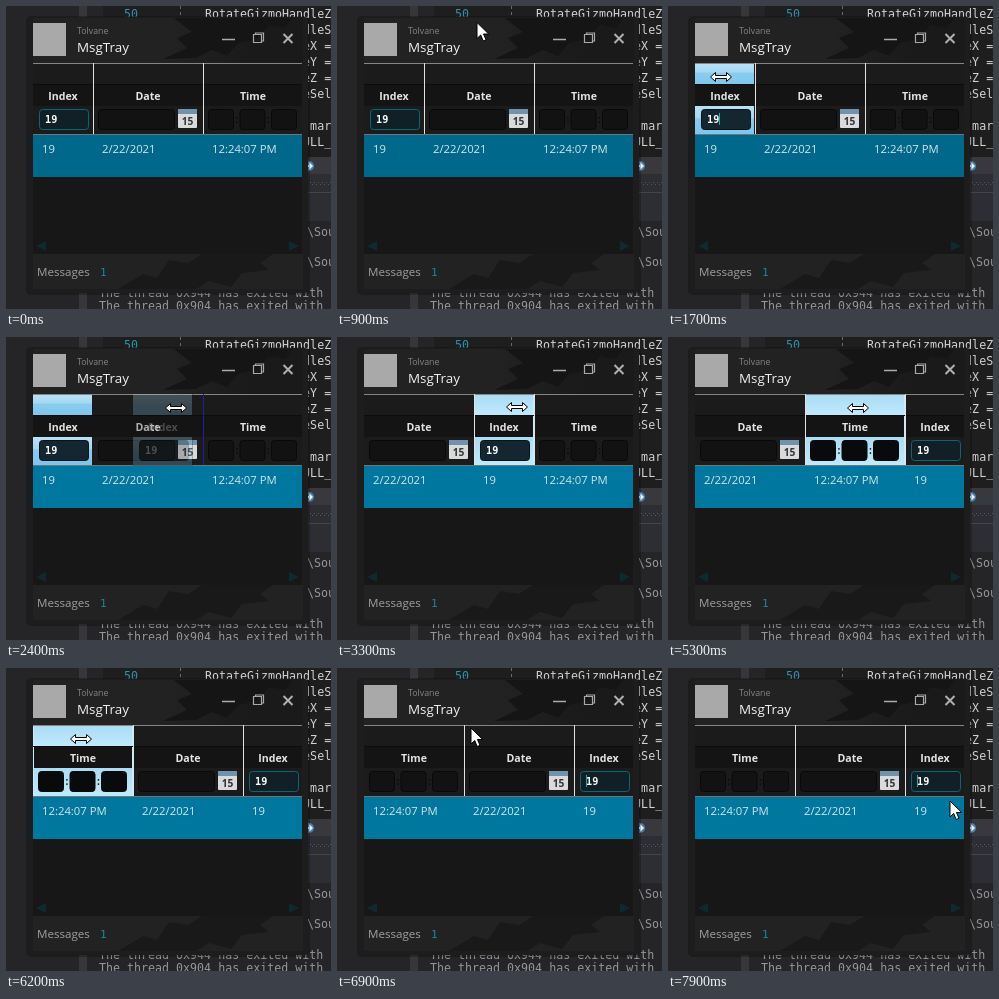
An HTML page for the animation above (8000 ms loop, 325x303 px).

```html
<!DOCTYPE html>
<html lang="en">
<head>
<meta charset="utf-8">
<title>Column reordering</title>
<style>
  html, body { margin: 0; width: 100%; height: 100%; overflow: hidden; background: #1e1e1e; }
  svg { display: block; width: 100vw; height: 100vh; }
  text { white-space: pre; }
  .ui { font-family: "Open Sans", "Noto Sans", sans-serif; }
  .mono { font-family: "DejaVu Sans Mono", "Noto Sans Mono", monospace; }
</style>
</head>
<body>
<svg id="stage" viewBox="0 0 325 303" preserveAspectRatio="none">
  <defs>
    <linearGradient id="hover" x2="0" y2="1">
      <stop offset="0" stop-color="#aadcf5"/><stop offset="1" stop-color="#bfeafd"/>
    </linearGradient>
    <linearGradient id="press" x2="0" y2="1">
      <stop offset="0" stop-color="#b9e2f6"/><stop offset=".42" stop-color="#a5d8f3"/>
      <stop offset=".45" stop-color="#8accf0"/><stop offset="1" stop-color="#7ec6ee"/>
    </linearGradient>
    <linearGradient id="title">
      <stop offset=".5" stop-color="#222"/><stop offset=".8" stop-color="#1a1a1a"/>
    </linearGradient>
  </defs>
  <g id="back"></g>
  <g id="grid"></g>
</svg>
<script>
const LOOP = 8000, STEP = 100, LEFT = 27, TOP = 57, FLOOR = 128, CODE = 11.65;
const WIDTH = { index: 60, date: 110, time: 100 };
const LABEL = { index: 'Index', date: 'Date', time: 'Time' };
const VALUE = { index: '19', date: '2/22/2021', time: '12:24:07 PM' };

// Column order from each moment on
const ORDERS = [
  [0, ['index', 'date', 'time']],
  [2800, ['date', 'index', 'time']],
  [4600, ['date', 'time', 'index']],
  [6200, ['time', 'date', 'index']]
];

const DRAGS = [
  { col: 'index', from: 1900, to: 2800, grip: 43, drop: 197 },
  { col: 'index', from: 4000, to: 4600, grip: 45, drop: 296 },
  { col: 'time', from: 5600, to: 6200, grip: 53, drop: 27 }
];

const HOVERS = [
  ['index', 1200, 1900], ['index', 2800, 4000], ['index', 4600, 5100],
  ['time', 5200, 5600], ['time', 6200, 6800]
];

const CARETS = [[1600, 1900, 24], [3800, 4600, 12], [6800, 7300, 12], [7800, 8000, 12]];

// time, x, y
const PATH = [
  [100, 60, 123], [200, 150, 78], [300, 250, 30], [400, 250, 30],
  [600, 272, 14], [800, 190, 1], [1000, 90, 32], [1150, 32, 88], [1300, 53, 71], [1700, 53, 71],
  [1900, 72, 71], [2400, 170, 71], [2600, 198, 71], [2700, 198, 71],
  [3300, 180, 70], [3900, 180, 70], [4300, 265, 69.5], [4500, 284, 70],
  [4900, 284, 70], [5300, 190, 71], [5400, 190, 71],
  [5700, 91, 71], [5800, 91, 71], [6000, 74, 71], [6200, 75, 71], [6500, 100, 71],
  [6700, 100, 71], [6900, 134, 60], [7100, 156, 42], [7400, 258, 135],
  [7600, 304, 202], [7700, 303, 190], [7900, 282, 133]
];

const rect = (x, y, w, h, fill, more = '') =>
  `<rect x="${x}" y="${y}" width="${w}" height="${h}" fill="${fill}" ${more}/>`;
const line = (x1, y1, x2, y2, color, w = 1) =>
  `<path d="M${x1} ${y1}L${x2} ${y2}" stroke="${color}" stroke-width="${w}"/>`;
const shape = (d, fill, more = '') => `<path d="${d}" fill="${fill}" ${more}/>`;
const text = (x, y, s, size, fill, font = 'ui', more = '') =>
  `<text class="${font}" x="${x}" y="${y}" font-size="${size}" fill="${fill}" ${more}>${s}</text>`;
const during = (t, from, to) => t >= from && t < to;

function editor() {
  const code = ['RotateGizmoHandleZ', 'RotateGizmoHandleS', 'MoveGizmoHandleX =', 'MoveGizmoHandleY =',
    'MoveGizmoHandleZ =', 'MoveGizmoHandleSel', '', '           For mar', '             NULL_'];
  const output = [[230, 301, '\\Sou'], [260, 301, '\\Sou'],
    [291, 93, 'The thread 0x944 has exited with c'], [304, 93, 'The thread 0x904 has exited with c']];
  let s = rect(0, 0, 325, 303, '#1e1e1e');
  s += rect(0, 0, 97, 303, '#252527') + rect(88, 280, 237, 23, '#252528') + rect(73, 0, 8, 303, '#36363b');
  s += '<path d="M174.500 0V12" stroke="#6a6a6a" stroke-dasharray="3 3"/>';
  s += text(118, 12, '50', CODE, '#2b91af', 'mono');
  code.forEach((c, i) => { s += text(199, 12 + 16 * i, c, CODE, '#d2d2d2', 'mono'); });
  s += rect(296, 151, 29, 17, '#38383d');
  s += '<circle cx="303" cy="160" r="5" fill="#3f83bd"/>' + shape('M299 159h4v-3l4 4l-4 4v-3h-4z', '#e8f2fa');
  s += rect(296, 168, 29, 47, '#2d2d34') + line(296, 186.5, 325, 186.5, '#44444d');
  for (let x = 304; x < 325; x += 4) s += rect(x, 176, 1, 1, '#55555e') + rect(x + 2, 178, 1, 1, '#55555e');
  s += rect(296, 215, 29, 70, '#252528');
  output.forEach(([y, x, c]) => { s += text(x, y, c, CODE, '#96969a', 'mono'); });
  return s;
}

function frame() {
  let s = rect(20, 10, 284, 279, '#000', 'opacity=".25" rx="5"');
  s += rect(22, 11, 280, 276, '#1d1d1d', 'rx="4"');
  s += rect(27, 12, 270, 45, 'url(#title)', 'rx="3"');
  s += shape('M168 12L286 12L279 22L263 19L250 33L232 37L221 50L206 44L190 52L157 53L181 42L171 32L186 26Z', '#151515');
  s += rect(27, 17, 33, 33, '#a9a9a9');
  s += text(71, 28, 'Tolvane', 8.8, '#858585') + text(71, 46, 'MsgTray', 13.4, '#f0f0f0');
  s += line(216, 33.5, 229, 33.5, '#aaa', 1.5);
  s += shape('M247.5 28.5h8v8h-8zM249.5 28v-1h8v8h-1.500', 'none', 'stroke="#a8a8a8" stroke-width="1.2"');
  s += shape('M277.5 28l9 9m0-9l-9 9', 'none', 'stroke="#b0b0b0" stroke-width="2"');
  s += rect(27, 128, 269, 120, '#171717');
  s += shape('M40 235l-10 5l10 5zM283 235l10 5l-10 5z', '#0c2a30');
  s += rect(27, 248, 270, 35, '#222');
  s += shape('M112 283L137 268L151 272L163 254L182 257L196 248L267 248L254 257L263 264L236 267L225 281L203 275L190 283Z', '#191919');
  s += text(31, 270, 'Messages', 11.6, '#a0a0a0') + text(94, 270, '1', 11, '#128ba0', 'mono');
  return s;
}

function filter(col, x, lit) {
  const field = (dx, w, fill = lit ? '#080a0b' : '#121212', stroke = '#090909') =>
    rect(x + dx + .5, 103.5, w, 20, fill, `rx="3" stroke="${stroke}"`);
  if (col === 'index')
    return field(6, 49, lit ? '#14262f' : '#102026', lit ? '#0b1216' : '#0d6478') +
      text(x + 12, 117, '19', 10.2, '#fff', 'mono', 'font-weight="700"');
  if (col === 'date')
    return field(5, 76) + rect(x + 85, 103, 19, 19, '#d9dadb', 'rx="1"') + rect(x + 85, 103, 19, 5, '#6f93ac') +
      text(x + 94.5, 118.5, '15', 10.2, '#333', 'ui', 'text-anchor="middle" font-weight="700"');
  let s = '';
  for (let i = 0; i < 3; i++) s += field(5 + 31.5 * i, 25);
  for (let i = 0; i < 2; i++) s += text(x + 32.5 + 31.5 * i, 117, ':', 10, lit ? '#111' : '#0a0a0a', 'ui', 'font-weight="700"');
  return s;
}

function header(col, x, lit) {
  const w = WIDTH[col], fill = lit && `url(#${lit})`;
  let s = rect(x, TOP, w, 72, '#1b1b1b') + rect(x, 79, w, 21, '#141414');
  if (lit) s += rect(x, TOP, w - 1, 22, fill) + rect(x, 100, w - 1, 28, fill);
  if (lit === 'hover') s += rect(x, TOP, 1, 71, '#c8edff') + rect(x + w - 1, TOP, 1, 71, '#c8edff');
  s += line(x, 78.5, x + w, 78.5, '#0c0c0c');
  s += text(x + w / 2, 94, LABEL[col], 10.6, '#e4e4e4', 'ui', 'text-anchor="middle" font-weight="700"');
  return s + filter(col, x, lit);
}

function pointer(t) {
  let i = PATH.findIndex(p => p[0] > t);
  if (i === 0) return null;
  if (i < 0) i = PATH.length;
  const a = PATH[i - 1], b = PATH[i] || a;
  const k = b === a ? 0 : (t - a[0]) / (b[0] - a[0]);
  return [a[1] + (b[1] - a[1]) * k, a[2] + (b[2] - a[2]) * k];
}

function cursor([x, y], wide) {
  const d = wide
    ? 'M-10.500 0l5-4.500v3h11v-3l5 4.500l-5 4.500v-3h-11v3z'
    : 'M0 0v16l3.7-3.5l2.5 6l2.8-1.2l-2.5-5.8h5.2z';
  return shape(d, '#fff', `stroke="#000" stroke-width="1" transform="translate(${x.toFixed(1)} ${y.toFixed(1)})"`);
}

function draw(t) {
  const order = ORDERS.filter(o => o[0] <= t).pop()[1];
  const drag = DRAGS.find(d => during(t, d.from, d.to));
  const hover = HOVERS.find(h => during(t, h[1], h[2]));
  const caret = CARETS.find(c => during(t, c[0], c[1]));
  const at = pointer(t);
  const pressed = drag || during(t, 1700, 1900);
  const active = drag ? drag.col : hover && hover[0];
  const left = {};
  let x = LEFT, s = rect(27, FLOOR, 269, 43, t < 1800 ? '#00688a' : '#00779e');
  for (const col of order) {
    left[col] = x;
    s += header(col, x, col === active && (pressed ? 'press' : 'hover'));
    s += text(x + 9, 146.5, VALUE[col], 11.3, '#d6e4ea');
    x += WIDTH[col];
  }
  s += line(LEFT, 57.5, 296, 57.5, '#858585') + line(LEFT, 128.5, 296, 128.5, '#6d777b');
  if (!drag) for (const col of order.slice(1)) s += line(left[col] + .5, TOP, left[col] + .5, FLOOR, '#e2e2e2');
  s += rect(296, TOP, 6, 114, '#1d1d1d');
  if (caret) s += rect(left.index + caret[2], 107, 1, 12, '#16b3a4');
  if (drag) {
    s += line(drag.drop + .5, TOP, drag.drop + .5, FLOOR, '#20209c');
    const gx = Math.max(21, Math.min(237, at[0] - drag.grip));
    s += `<g opacity=".26">${header(drag.col, +gx.toFixed(1), 'press')}</g>`;
  }
  if (at) s += cursor(at, during(t, 1200, 6800));
  grid.innerHTML = s;
}

const grid = document.getElementById('grid');
document.getElementById('back').innerHTML = editor() + frame();

let shown = -1;
function tick() {
  const t = Math.floor(performance.now() % LOOP / STEP) * STEP;
  if (t !== shown) draw(shown = t);
  requestAnimationFrame(tick);
}
tick();
</script>
</body>
</html>
```
